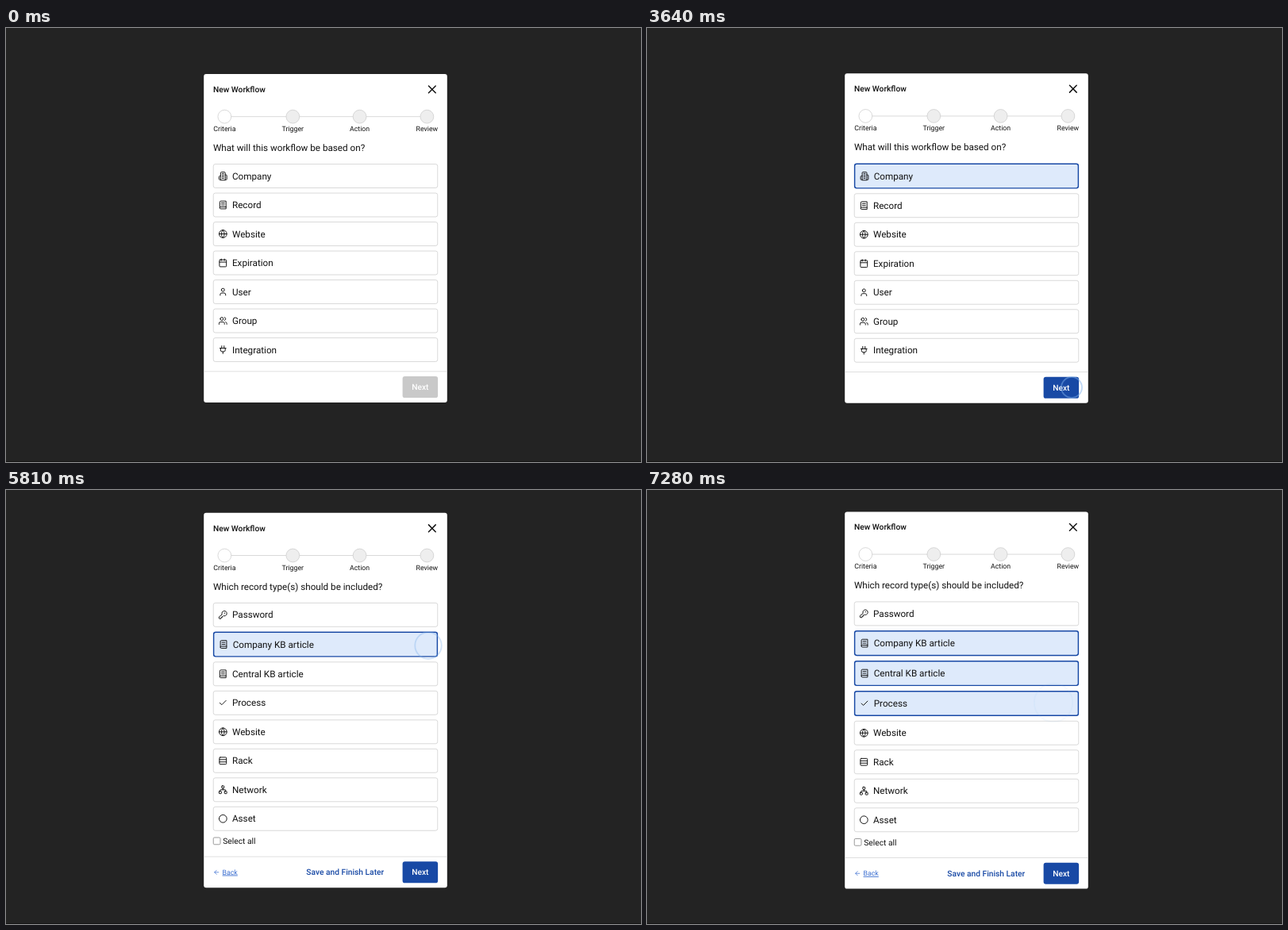
An HTML page for the animation above (8 s loop, 800 by 547 pixels).

```html
<!DOCTYPE html>
<html lang="en">
<head>
<meta charset="utf-8">
<title>New Workflow</title>
<style>
  html, body { margin: 0; height: 100%; overflow: hidden; background: #232323; }
  svg { display: block; width: 800px; height: 547px; font-family: Roboto, sans-serif; text-rendering: geometricPrecision; }
  .icon { fill: none; stroke: #111; stroke-width: 2; stroke-linecap: round; stroke-linejoin: round; }
</style>
</head>
<body>
<svg viewBox="0 0 800 547">
  <rect y="546" width="800" height="1" fill="#141414"/>
  <g id="dialog"></g>
  <circle id="ring" fill="none" stroke="#7fb0ea" stroke-width="1.8"/>
</svg>
<script>
const LOOP = 8000, SCALE = 0.73, WIDTH = 420, CENTER_Y = 265;
const BLUE = '#1849a5', PALE = '#deeafb', GRAY = '#cbcbcb';

const box = (x, y, w, h, r = 2) =>
  `M${x + r} ${y}h${w - 2 * r}a${r} ${r} 0 0 1 ${r} ${r}v${h - 2 * r}a${r} ${r} 0 0 1 ${-r} ${r}h${2 * r - w}a${r} ${r} 0 0 1 ${-r} ${-r}v${2 * r - h}a${r} ${r} 0 0 1 ${r} ${-r}z`;
const disc = (x, y, r) => `M${x - r} ${y}a${r} ${r} 0 1 0 ${2 * r} 0a${r} ${r} 0 1 0 ${-2 * r} 0`;

// Icons on a 24 unit grid
const ICONS = {
  building: 'M6 22V4a2 2 0 0 1 2-2h8a2 2 0 0 1 2 2v18zM6 12H4a2 2 0 0 0-2 2v6a2 2 0 0 0 2 2h2M18 9h2a2 2 0 0 1 2 2v9a2 2 0 0 1-2 2h-2M10 6h4M10 10h4M10 14h4M10 18h4',
  book: 'M4 19.5v-15A2.5 2.5 0 0 1 6.5 2H20v20H6.5a2.5 2.5 0 0 1 0-5H20M8 7h8M8 12h8',
  globe: disc(12, 12, 10) + 'M2 12h20M12 2a14.5 14.5 0 0 0 0 20 14.5 14.5 0 0 0 0-20',
  calendar: box(3, 4, 18, 18) + 'M8 2v4M16 2v4M3 10h18',
  user: disc(12, 7, 4) + 'M19 21v-2a4 4 0 0 0-4-4H9a4 4 0 0 0-4 4v2',
  users: disc(9, 7, 4) + 'M16 21v-2a4 4 0 0 0-4-4H6a4 4 0 0 0-4 4v2M22 21v-2a4 4 0 0 0-3-3.87M16 3.13a4 4 0 0 1 0 7.75',
  plug: 'M12 22v-5M9 8V2M15 8V2M4 8h16M18 8v5a4 4 0 0 1-4 4h-4a4 4 0 0 1-4-4V8',
  key: 'M2 18v3c0 .6.4 1 1 1h4v-3h3v-3h2l1.4-1.4a6.5 6.5 0 1 0-4-4z' + disc(16.5, 7.5, .5),
  check: 'M20 6 9 17l-5-5',
  rack: box(3, 3, 18, 18) + 'M3 9h18M3 15h18',
  network: box(16, 16, 6, 6, 1) + box(2, 16, 6, 6, 1) + box(9, 2, 6, 6, 1) + 'M5 16v-3a1 1 0 0 1 1-1h12a1 1 0 0 1 1 1v3M12 12V8',
  circle: disc(12, 12, 10),
  close: 'M18 6 6 18M6 6l12 12',
  back: 'm12 19-7-7 7-7M19 12H5'
};

const PAGES = [
  { title: 'What will this workflow be based on?', rows: [
    ['building', 'Company'], ['book', 'Record'], ['globe', 'Website'], ['calendar', 'Expiration'],
    ['user', 'User'], ['users', 'Group'], ['plug', 'Integration']] },
  { title: 'Which record type(s) should be included?', rows: [
    ['key', 'Password'], ['book', 'Company KB article'], ['book', 'Central KB article'], ['check', 'Process'],
    ['globe', 'Website'], ['rack', 'Rack'], ['network', 'Network'], ['circle', 'Asset']] }
];
const STEPS = [['Criteria', 35.8], ['Trigger', 153.6], ['Action', 269], ['Review', 385.2]];

// A press shows a ring at once; its effect follows after PRESS ms
const PRESS = 140, RING = 490, TURN = 3640 + PRESS;
const CLICKS = [
  { at: 2030, x: 524, y: 188, page: 0, row: 0 },
  { at: 3640, x: 535, y: 453 },
  { at: 5670, x: 532, y: 196, page: 1, row: 1 },
  { at: 6300, x: 524, y: 225.5, page: 1, row: 2 },
  { at: 6860, x: 512, y: 268, page: 1, row: 3 }
];
const HOVERS = [[0, -1], [1750, 0], [3080, -1], [5390, 1], [6160, 2], [6720, 3]];

const text = (x, y, size, str, attrs = '') => `<text x="${x}" y="${y}" font-size="${size}" ${attrs}>${str}</text>`;
const rect = (x, y, w, h, r, attrs) => `<rect x="${x}" y="${y}" width="${w}" height="${h}" rx="${r}" ${attrs}/>`;
const icon = (name, x, y, size, attrs = '') =>
  `<path class="icon" transform="translate(${x} ${y}) scale(${size / 24})" d="${ICONS[name]}" ${attrs}/>`;
const MID = 'text-anchor="middle"', MEDIUM = 'font-weight="500"';

function header(title) {
  const steps = STEPS.map(([name, x], i) =>
    `<circle cx="${x}" cy="73.5" r="11.5" fill="${i ? '#eee' : '#fff'}" stroke="${GRAY}"/>` + text(x, 98.6, 12, name, MID));
  return text(16, 31.5, 14, 'New Workflow', MEDIUM) + icon('close', 382, 14.6, 24) +
    `<path d="M36 73.5H385" stroke="${GRAY}"/>` + steps.join('') + text(16, 133, 16, title);
}

function row([name, label], y, on, hot) {
  const b = on ? 2 : 1, h = 40 + 2 * b;
  return rect(16 + b / 2, y + b / 2, 388 - b, h - b, 3.5,
      `fill="${on || hot ? PALE : '#fff'}" stroke="${on ? BLUE : hot ? '#bccbe0' : GRAY}" stroke-width="${b}"`) +
    icon(name, 24 + b, y + h / 2 - 8, 16) + text(48 + b, y + h / 2 + 5.5, 16, label);
}

function footer(y, page, ready) {
  const mid = y + 27.5;
  let out = rect(0, y, WIDTH, 1, 0, 'fill="#d4d4d4"') +
    rect(343, y + 9, 61, 37, 4, `fill="${ready ? BLUE : '#c9c9c9'}"`) +
    text(373.5, mid + 4.8, 14, 'Next', `${MID} ${MEDIUM} fill="#fff"`);
  if (page) {
    out += icon('back', 16, mid - 6, 12, 'style="stroke:#3c6fd0"') +
      text(32, mid + 4.1, 12, 'Back', 'fill="#3c6fd0" text-decoration="underline"') +
      text(243.9, mid + 4.8, 14, 'Save and Finish Later', `${MID} ${MEDIUM} fill="${BLUE}"`);
  }
  return out;
}

function dialog(page, selected, hover) {
  const { title, rows } = PAGES[page];
  let y = 155, body = header(title);
  rows.forEach((item, i) => {
    const on = selected.includes(i);
    body += row(item, y, on, i === hover);
    y += on ? 52 : 50;
  });
  y -= 8;
  if (page) {
    body += rect(16.5, y + 11.5, 12, 12, 2, 'fill="#fff" stroke="#767676"') + text(33, y + 22.8, 14, 'Select all');
    y += 28;
  }
  y += 16;
  const height = y + 54, top = CENTER_Y - height / 2 * SCALE;
  return `<g transform="translate(249.2 ${top}) scale(${SCALE})" fill="#111">` +
    rect(0, 0, WIDTH, height, 4, 'fill="#fff"') + body + footer(y, page, selected.length > 0) + '</g>';
}

const dialogEl = document.getElementById('dialog'), ring = document.getElementById('ring');
let shown = '';

function draw(now) {
  const t = now % LOOP, page = t < TURN ? 0 : 1;
  const selected = CLICKS.filter(c => c.page === page && t >= c.at + PRESS).map(c => c.row);
  const hover = HOVERS.filter(h => t >= h[0]).pop()[1];
  const key = [page, hover, ...selected].join();
  if (key !== shown) {
    dialogEl.innerHTML = dialog(page, selected, hover);
    shown = key;
  }
  const click = CLICKS.find(c => t >= c.at && t < c.at + RING);
  ring.setAttribute('opacity', 0);
  if (click) {
    const p = (t - click.at) / RING;
    ring.setAttribute('cx', click.x);
    ring.setAttribute('cy', click.y);
    ring.setAttribute('r', 13 + 13 * p);
    ring.setAttribute('opacity', 0.5 * (1 - p));
  }
  requestAnimationFrame(draw);
}
draw(0);
</script>
</body>
</html>
```
